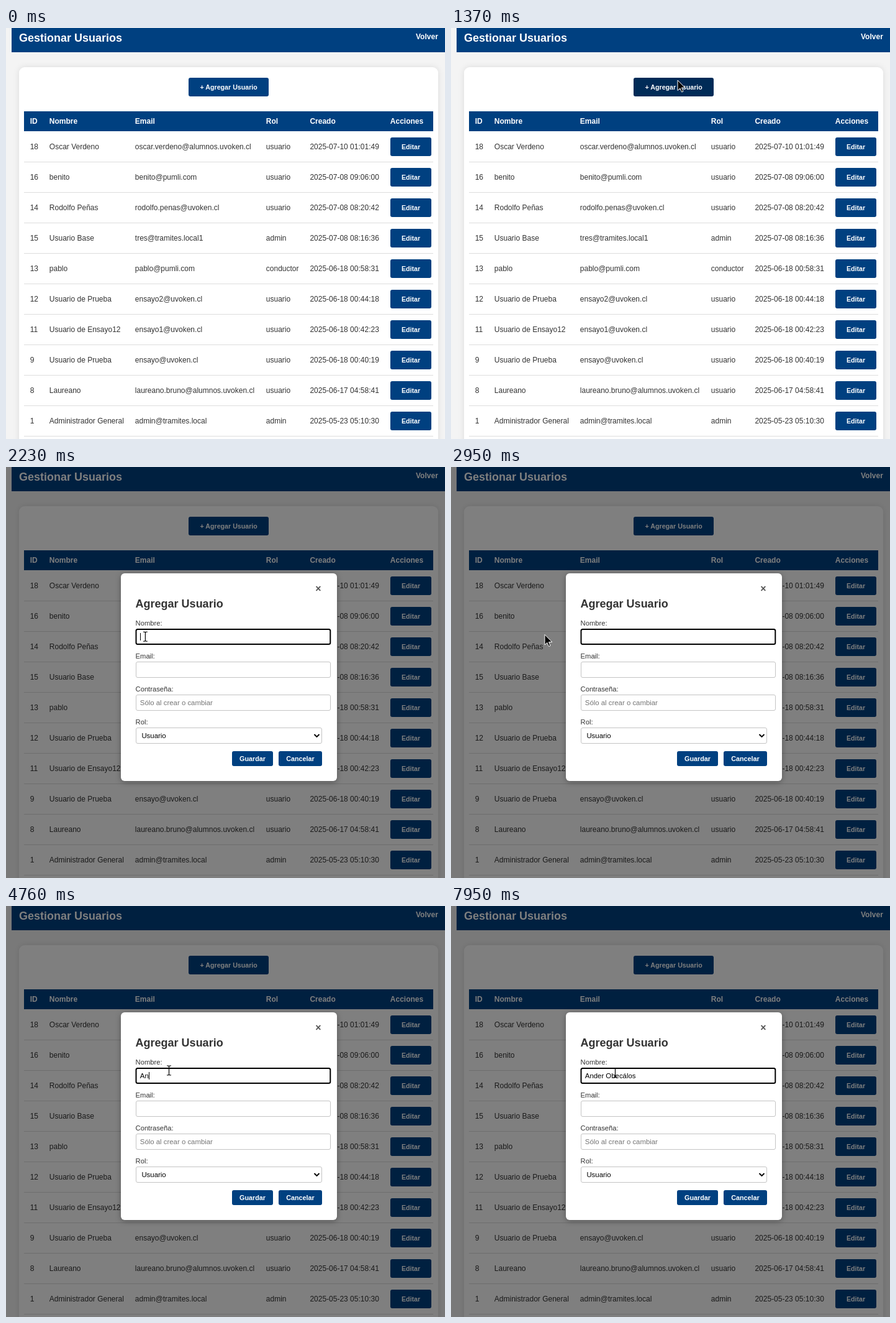
Recreate the animation shown at these times as an HTML page. Size 707 px wide and 661 px high, loop 8000 ms.

```html
<!DOCTYPE html>
<html lang="es">
<head>
<meta charset="utf-8">
<title>Gestionar Usuarios</title>
<style>
  html, body { margin: 0; width: 100%; height: 100%; overflow: hidden; background: #f4f4f4; }
  svg { display: block; width: 707px; height: 661px; font-family: "Liberation Sans", Arial, sans-serif; }
  text { white-space: pre; }
  .blue { fill: #004080; }
  .hover { fill: #002b57; }
  .bold { font-weight: bold; }
  .white { fill: #fff; }
  .mid { text-anchor: middle; }
  .cell { font-size: 12px; fill: #333; }
  .head { font-size: 12px; font-weight: bold; fill: #fff; }
  .title { font-size: 18px; font-weight: bold; }
  .btn { font-size: 10.67px; font-weight: bold; fill: #fff; text-anchor: middle; }
  .label { font-size: 11.2px; fill: #333; }
  .input { font-size: 11.4px; }
  .field { fill: #fff; stroke: #c4c4c4; }
  .card { fill: #fff; filter: drop-shadow(0 0 5px rgba(0, 0, 0, .1)); }
  .dialog { fill: #fff; filter: drop-shadow(0 2px 5px rgba(0, 0, 0, .3)); }
  .tip { font: 11px "Open Sans", "Noto Sans", sans-serif; fill: #444; }
</style>
</head>
<body>
<svg viewBox="0 0 707 661">
  <rect width="707" height="661" fill="#f4f4f4"/>
  <rect class="blue" x="9" width="698" height="39"/>
  <text class="title white" x="21" y="22">Gestionar Usuarios</text>
  <text class="head" x="660" y="18">Volver</text>
  <rect class="card" x="21" y="63" width="675" height="620" rx="9"/>
  <rect id="add" class="blue" x="294" y="80" width="129" height="30" rx="3"/>
  <text class="btn" x="358.7" y="99">+ Agregar Usuario</text>
  <rect class="blue" x="29" y="134" width="659" height="32"/>
  <g id="table"></g>

  <g id="modal">
    <rect width="707" height="661" fill="#000" opacity=".5"/>
    <rect class="dialog" x="185" y="171" width="348" height="334" rx="6"/>
    <text class="bold mid" x="503" y="201" font-size="16" fill="#555">×</text>
    <text class="title" x="208.6" y="226" fill="#333">Agregar Usuario</text>
    <g id="form"></g>
    <text class="input" x="215.8" y="383" fill="#757575">Sólo al crear o cambiar</text>
    <text class="input" x="218.4" y="436">Usuario</text>
    <path d="M496.5 430l4 4 4-4" fill="none" stroke="#000" stroke-width="1.9"/>
    <rect class="blue" x="364" y="457" width="66" height="24" rx="3"/>
    <rect class="blue" x="439" y="457" width="70" height="24" rx="3"/>
    <text class="btn" x="397" y="473" style="font-size:10.8px">Guardar</text>
    <text class="btn" x="474" y="473" style="font-size:10.8px">Cancelar</text>
    <rect id="ring" x="209.5" y="261" width="312.8" height="24" rx="2.5" fill="none" stroke="#000" stroke-width="2"/>
    <text id="name" class="input" x="215.8" y="277"></text>
    <rect id="caret" y="267" width="1" height="12"/>
    <g id="tooltip">
      <rect x="272.5" y="280.5" width="121" height="22" fill="#fff" stroke="#8a8a8a"/>
      <text class="tip mid" x="333" y="295.5">Completa este campo</text>
    </g>
  </g>

  <g id="cursor">
    <path id="arrow" d="M0 0V16.5L3.9 13 6.5 19 9 18 6.5 12H11.8Z" stroke="#fff"/>
    <g id="hand" stroke="#000" fill="none">
      <path fill="#fff" d="M-2 1.5a1.9 1.9 0 0 1 3.8 0V7.2l1.2-.6 2.4 1 2.2.4 2 1.4v5.6l-2 6H-1.8l-1-3-3.4-5c-1.6-2.4.6-3.6 2-2l2.2 2.2z"/>
      <path d="M1.8 7v4M5.4 8v3.5M7.6 8.5V12"/>
    </g>
    <path id="beam" d="M-3.5-7.5H-1L0-6.5 1-7.5H3.5M0-6.5V6.5M-3.5 7.5H-1L0 6.5 1 7.5H3.5" fill="none" stroke="#000" stroke-width="1.2"/>
  </g>
</svg>
<script>
const LOOP = 8000;
const $ = id => document.getElementById(id);
const show = (id, on) => { $(id).style.display = on ? '' : 'none'; };

function add(parent, tag, attrs, text = '') {
  const el = document.createElementNS('http://www.w3.org/2000/svg', tag);
  for (const key in attrs) el.setAttribute(key, attrs[key]);
  el.textContent = text;
  return $(parent).appendChild(el);
}

const columns = [38.7, 69.8, 207.8, 418.8, 489.4, 618.8];
const rows = `18|Oscar Verdeno|oscar.verdeno@alumnos.uvoken.cl|usuario|2025-07-10 01:01:49
16|benito|benito@pumli.com|usuario|2025-07-08 09:06:00
14|Rodolfo Peñas|rodolfo.penas@uvoken.cl|usuario|2025-07-08 08:20:42
15|Usuario Base|tres@tramites.local1|admin|2025-07-08 08:16:36
13|pablo|pablo@pumli.com|conductor|2025-06-18 00:58:31
12|Usuario de Prueba|ensayo2@uvoken.cl|usuario|2025-06-18 00:44:18
11|Usuario de Ensayo12|ensayo1@uvoken.cl|usuario|2025-06-18 00:42:23
9|Usuario de Prueba|ensayo@uvoken.cl|usuario|2025-06-18 00:40:19
8|Laureano|laureano.bruno@alumnos.uvoken.cl|usuario|2025-06-17 04:58:41
1|Administrador General|admin@tramites.local|admin|2025-05-23 05:10:30`.split('\n');

['ID', 'Nombre', 'Email', 'Rol', 'Creado', 'Acciones'].forEach((label, c) =>
  add('table', 'text', { class: 'head', x: columns[c], y: 154 }, label));

const editButtons = rows.map((row, i) => {
  const y = 166 + 49 * i;
  row.split('|').forEach((value, c) =>
    add('table', 'text', { class: 'cell', x: columns[c], y: y + 29 }, value));
  add('table', 'rect', { x: 29, y: y + 49, width: 659, height: 1, fill: '#ddd' });
  const button = add('table', 'rect', { class: 'blue', x: 619, y: y + 10, width: 66, height: 30, rx: 3 });
  add('table', 'text', { class: 'btn', x: 652, y: y + 29 }, 'Editar');
  return button;
});

['Nombre:', 'Email:', 'Contraseña:', 'Rol:'].forEach((label, i) => {
  const y = 260 + 53 * i;
  add('form', 'text', { class: 'label', x: 208.6, y: y - 5 }, label);
  add('form', 'rect', { class: 'field', x: 209.5, y: y + .5, width: i < 3 ? 313 : 299, height: 25, rx: 2.5 });
});

// Pointer path: time, x, y
const path = [
  [80, 655, 650], [390, 652, 436], [480, 658, 356], [640, 560, 265], [760, 370, 205], [880, 173, 190],
  [1000, 205, 165], [1150, 300, 118], [1290, 365, 84],
  [1630, 365, 84], [1790, 230, 190], [1930, 99, 288], [2080, 225, 273],
  [2230, 225, 273], [2400, 120, 230], [2520, 39, 300], [2650, 60, 358], [2780, 130, 300], [2870, 105, 210],
  [2950, 150, 269.5], [3010, 208, 270], [3040, 258, 266], [3070, 262.5, 264.5],
  [7949, 262.5, 264.5], [7950, 264.5, 268.5]
];

function pointer(t) {
  const next = path.findIndex(p => p[0] > t);
  if (next < 1) return (next ? path.at(-1) : path[0]).slice(1);
  const [a, b] = [path[next - 1], path[next]];
  const k = (t - a[0]) / (b[0] - a[0]);
  return [a[1] + (b[1] - a[1]) * k, a[2] + (b[2] - a[2]) * k];
}

const inside = ([x, y], left, top, right, bottom) => x >= left && x < right && y >= top && y < bottom;
const between = (t, from, to) => t >= from && t < to;

const fullName = 'Ander Obecálos';
const keyTimes = [4310, 4760, 4890, 5050, 5180, 5360, 5590, 5860, 5960, 6120, 7130, 7200, 7290, 7460];
const caretOff = [[2710, 3230], [3750, 4280], [6680, 7130], [7950, LOOP]];

function render(t) {
  const modal = t >= 1400, focused = t >= 2230;
  const pos = pointer(t), late = pointer(t - 90);

  // Hover follows the pointer with a short lag
  let onButton = false;
  editButtons.forEach((button, i) => {
    const y = 176 + 49 * i;
    const on = between(t, 80, 900) && inside(late, 619, y, 685, y + 30);
    button.setAttribute('class', on ? 'hover' : 'blue');
    onButton ||= on;
  });
  const addHover = !modal && t > 900 && inside(pos, 294, 80, 423, 110);
  $('add').setAttribute('class', addHover ? 'hover' : 'blue');

  show('modal', modal);
  show('ring', focused);
  show('tooltip', between(t, 3580, 4310));
  $('name').textContent = fullName.slice(0, keyTimes.filter(k => k <= t).length);
  show('caret', focused && !caretOff.some(([from, to]) => between(t, from, to)));
  if (modal) $('caret').setAttribute('x', Math.round(215.8 + $('name').getComputedTextLength()));

  const beam = modal && inside(pos, 208, 260, 523, 286);
  show('cursor', t >= 80);
  show('hand', onButton);
  show('beam', beam);
  show('arrow', !onButton && !beam);
  $('cursor').setAttribute('transform', `translate(${pos})`);
}

const start = performance.now();
function tick() {
  render((performance.now() - start) % LOOP);
  requestAnimationFrame(tick);
}
tick();
</script>
</body>
</html>
```
